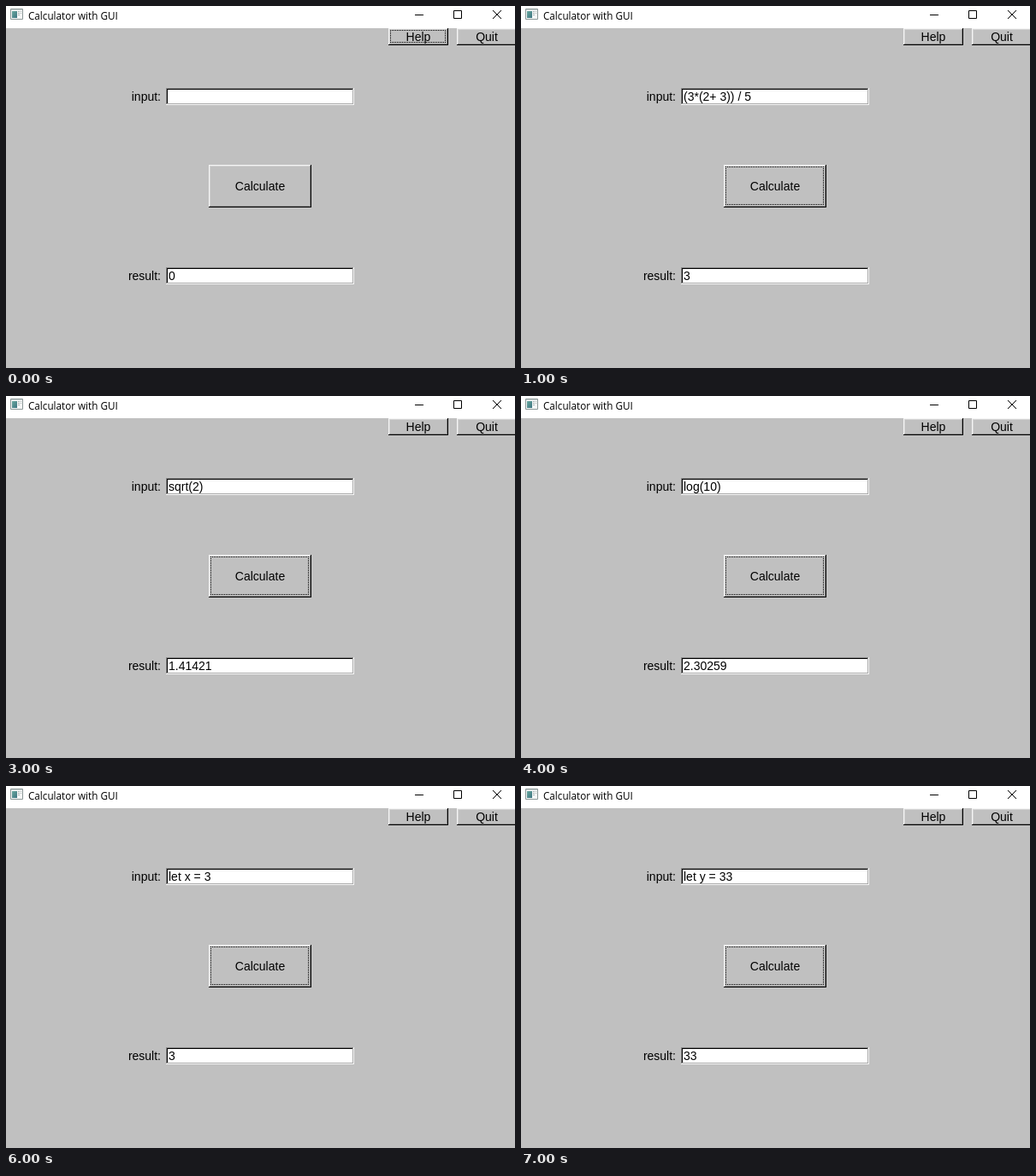
Write an HTML page that moves like this. It is 595x424 px and loops after 8 s.

```html
<!DOCTYPE html>
<html lang="en">
<head>
<meta charset="utf-8">
<title>Calculator with GUI</title>
<style>
  html, body { margin: 0; width: 100%; height: 100%; overflow: hidden; background: #c0c0c0; }
  body { font: 14px/20px "Liberation Sans", Arial, sans-serif; color: #000; }
  #app { position: absolute; left: 0; top: 0; width: 595px; height: 424px; overflow: hidden; background: #c0c0c0; }
  #app > * { position: absolute; box-sizing: border-box; white-space: pre; }

  .bar { left: 0; top: 0; width: 595px; height: 26px; background: #fff; }
  .title { left: 26px; top: 1px; font: 11.7px/20px "Open Sans", "Noto Sans", sans-serif; }

  .button {
    text-align: center;
    box-shadow: inset -1px -1px #000, inset 1px 1px #f5f5f5,
                inset -2px -2px #8a8a8a, inset 2px 2px #d5d5d5;
  }
  .small { top: 26px; width: 70px; height: 20px; }
  .help { left: 447px; }
  .quit { left: 527px; }
  .calc { left: 237px; top: 186px; width: 120px; height: 50px; line-height: 50px; }

  /* dotted keyboard focus rectangle */
  .focus::after {
    content: ""; position: absolute; left: 2px; top: 2px; right: 3px; bottom: 3px;
    --x: repeating-linear-gradient(90deg, #000 0 1px, transparent 1px 2px);
    --y: repeating-linear-gradient(#000 0 1px, transparent 1px 2px);
    background: var(--x) 0 0 / 100% 1px no-repeat, var(--x) 0 100% / 100% 1px no-repeat,
                var(--y) 0 0 / 1px 100% no-repeat, var(--y) 100% 0 / 1px 100% no-repeat;
  }

  .field {
    left: 187px; width: 220px; height: 20px; padding-left: 3px; background: #fff;
    box-shadow: inset -1px -1px #f5f5f5, inset 1px 1px #8a8a8a,
                inset -2px -2px #ababab, inset 2px 2px #000;
  }
  .label { right: 414px; }
  .upper { top: 96px; }
  .lower { top: 306px; }
</style>
</head>
<body>
<div id="app">
  <svg class="bar" width="595" height="26" fill="none" stroke="#000">
    <defs>
      <linearGradient id="pane" x2="1" y2="1">
        <stop stop-color="#6aa9a0"/><stop offset="1" stop-color="#3c7480"/>
      </linearGradient>
    </defs>
    <path d="M5.5 3.5h14v12h-14z" fill="#f4f6f6" stroke="#8b9797"/>
    <path d="M6 4.5h13" stroke="#cdd5d5"/>
    <path d="M7 6h6v8H7z" fill="url(#pane)" stroke="none"/>
    <path d="M14 6.5h2M14 8.5h2M14 10.5h2M17 6.5h1M17 8.5h1" stroke="#a9b3b3"/>
    <path d="M478 10.5h10M523.5 5.5h9v9h-9z"/>
    <path d="M569 5l10 10M579 5l-10 10"/>
  </svg>
  <div class="title">Calculator with GUI</div>
  <div class="button small help" id="help">Help</div>
  <div class="button small quit">Quit</div>
  <div class="label upper">input:</div>
  <div class="field upper" id="input"></div>
  <div class="button calc" id="calc">Calculate</div>
  <div class="label lower">result:</div>
  <div class="field lower" id="result"></div>
</div>
<script>
  const STEP = 1000;
  const steps = [
    ["", "0"],
    ["(3*(2+ 3)) / 5", "3"],
    ["pow(2, 16)", "65536"],
    ["sqrt(2)", "1.41421"],
    ["log(10)", "2.30259"],
    ["log(e)", "1"],
    ["let x = 3", "3"],
    ["let y = 33", "33"]
  ];
  const [help, calc, input, result] =
    ["help", "calc", "input", "result"].map(id => document.getElementById(id));
  const start = performance.now();
  let shown = -1;

  function show(i) {
    [input.textContent, result.textContent] = steps[i];
    help.classList.toggle("focus", i === 0);
    calc.classList.toggle("focus", i > 0);
    shown = i;
  }

  function tick() {
    const i = Math.floor((performance.now() - start) / STEP) % steps.length;
    if (i !== shown) show(i);
    requestAnimationFrame(tick);
  }
  tick();
</script>
</body>
</html>
```
